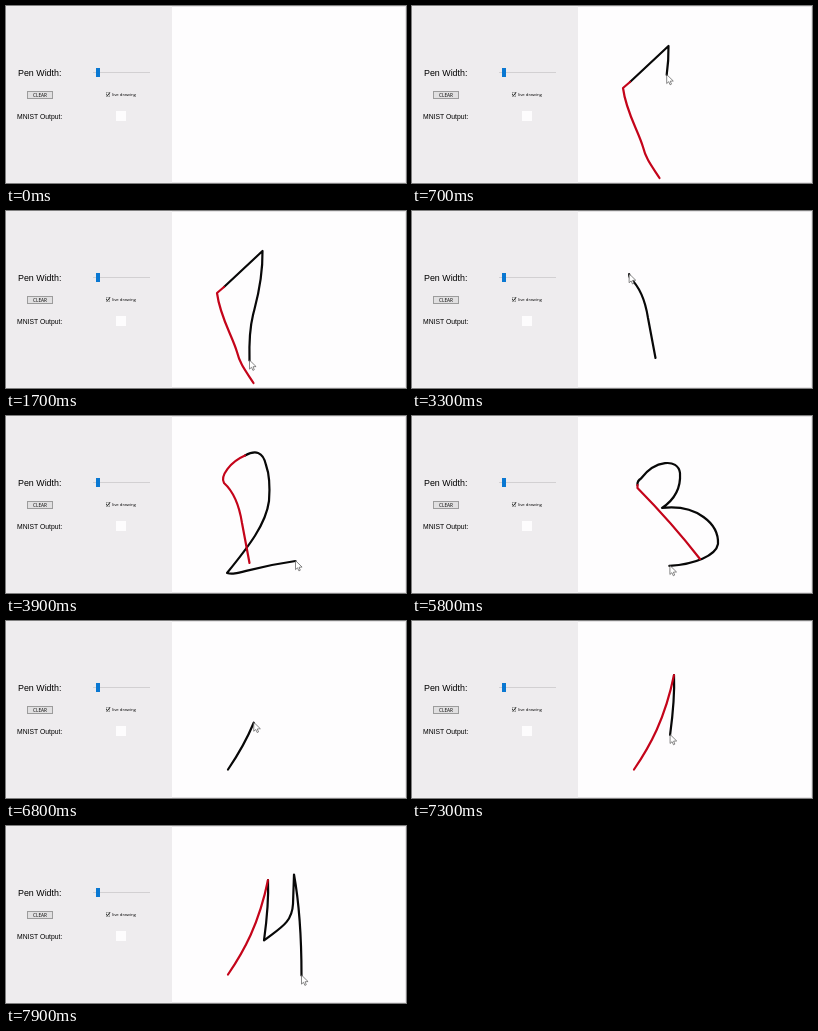
Write an HTML page with a canvas that moves like this. It is 400 px wide and 177 px high and loops after 8000 ms.

```html
<!DOCTYPE html>
<html lang="en">
<head>
<meta charset="utf-8">
<title>Digit drawing</title>
<style>
  html, body { margin: 0; width: 100%; height: 100%; overflow: hidden; background: #fefdfe; }
  canvas { display: block; width: 400px; height: 177px; }
</style>
</head>
<body>
<canvas id="stage"></canvas>
<script>
const W = 400, H = 177, LOOP = 8000, STEP = 100;
const BLACK = '#080808', RED = '#c4041a';
const canvas = document.getElementById('stage');
const ctx = canvas.getContext('2d');
const ratio = window.devicePixelRatio || 1;
canvas.width = W * ratio;
canvas.height = H * ratio;

// A pen movement along a path between two times; ease above 1 slows towards the end.
function move(from, to, d, ease = 1) {
  const curve = document.createElementNS('http://www.w3.org/2000/svg', 'path');
  curve.setAttribute('d', d);
  const length = curve.getTotalLength();
  const path = new Path2D(d);
  return {
    from,
    travelled(time) {
      const k = Math.min(Math.max((time - from) / (to - from), 0), 1);
      return length * (1 - (1 - k) ** ease);
    },
    tip(time) {
      return curve.getPointAtLength(this.travelled(time));
    },
    ink(time, color) {
      const done = this.travelled(time);
      if (!done) return;
      ctx.setLineDash([done, 2 * length]);
      ctx.lineCap = ctx.lineJoin = 'round';
      ctx.lineWidth = 2.2;
      ctx.strokeStyle = color;
      ctx.stroke(path);
      ctx.setLineDash([]);
    }
  };
}

// Each drawing clears the canvas, approaches the digit, then writes it.
const drawings = [
  {
    clear: 0,
    approach: move(100, 400, 'M247.5 172 C239 159 234 153 231 141 C226 124 214 106 211 82 L218 76'),
    digit: move(500, 1100, 'M218 76 L256.5 40 C257 70 250 92 247 104 S243 130 243.5 149.5')
  },
  {
    clear: 2600,
    approach: move(3000, 3550, 'M243.5 147 L236 107 C233 88 228 76 218 67 C214 60 224 46 239 39.5'),
    digit: move(3550, 4000, 'M239 39.5 C249 34 257 35 260 49 C264 60 264 72 263 85 C260 108 243 130 221 157 C231 160 240 152 289.5 145')
  },
  {
    clear: 4300,
    approach: move(4800, 5170, 'M288 143 Q260 107 225.5 72 V69'),
    digit: move(5170, 6100, 'M225.5 69 Q225 65 229 62.5 C243 44 266 42 268 57 C269 72 262 84 250 92 C285 88 307 108 306 128 C303 145 260 155 222 148', 1.3)
  },
  {
    clear: 6300,
    approach: move(6800, 7100, 'M222 148.5 C238 125 253 98 262 54', 1.8),
    digit: move(7200, 8000, 'M262 54 Q263 78 258 114.5 C274 102 286 97 287 78 L288 48.5 Q295.5 90 295.5 149.5')
  }
];

const arrow = new Path2D('M0 0 V8.6 L2 6.8 L3.4 9.9 L4.8 9.2 L3.5 6.3 L6.2 6.1 Z');

function pointer({ x, y }) {
  ctx.save();
  ctx.translate(x, y);
  ctx.fillStyle = '#fff';
  ctx.fill(arrow);
  ctx.strokeStyle = '#555';
  ctx.lineWidth = 0.7;
  ctx.lineJoin = 'miter';
  ctx.stroke(arrow);
  ctx.restore();
}

function box(color, x, y, w, h) {
  ctx.fillStyle = color;
  ctx.fillRect(x, y, w, h);
}

function label(text, x, y, size, family) {
  ctx.font = `${size}px ${family}`;
  ctx.fillStyle = '#000';
  ctx.fillText(text, x, y);
}

function panel() {
  const arial = '"Liberation Sans", Arial, sans-serif';
  const ui = '"Open Sans", sans-serif';
  box('#e6e4e6', 0, 0, W, H);
  box('#fefdfe', 166, 1, 233, 175);
  box('#eeecee', 0, 0, 166, H);

  label('Pen Width:', 12, 70, 8.9, arial);
  box('#d2d0d2', 87, 66, 57, 1);
  box('#0a78d2', 90, 62, 4, 9);

  box('#9c9c9c', 21, 85, 26, 8);
  box('#e1e0e1', 22, 86, 24, 6);
  label('CLEAR', 27, 90.6, 4.7, ui);

  box('#888', 100, 86, 4, 5);
  box('#f8f8f8', 100.6, 86.6, 2.8, 3.8);
  ctx.strokeStyle = '#111';
  ctx.lineWidth = 0.9;
  ctx.stroke(new Path2D('M100.6 88.4 L101.6 89.6 L103.8 86.6'));
  label('live drawing', 106, 90.4, 4.3, ui);

  label('MNIST Output:', 11, 112.5, 6.8, arial);
  box('#fdfcfd', 110, 105, 10, 10);
}

function draw(time) {
  const t = Math.floor((time % LOOP) / STEP) * STEP;
  const pen = t + STEP;
  ctx.setTransform(ratio, 0, 0, ratio, 0, 0);
  panel();

  const { approach, digit } = drawings.findLast(d => d.clear <= t);
  const writing = pen > digit.from;
  digit.ink(pen, BLACK);
  approach.ink(pen, writing ? RED : BLACK);
  if (t > 0) pointer((writing ? digit : approach).tip(pen));
}

const begin = performance.now();
function frame() {
  draw(performance.now() - begin);
  requestAnimationFrame(frame);
}
frame();
</script>
</body>
</html>
```
